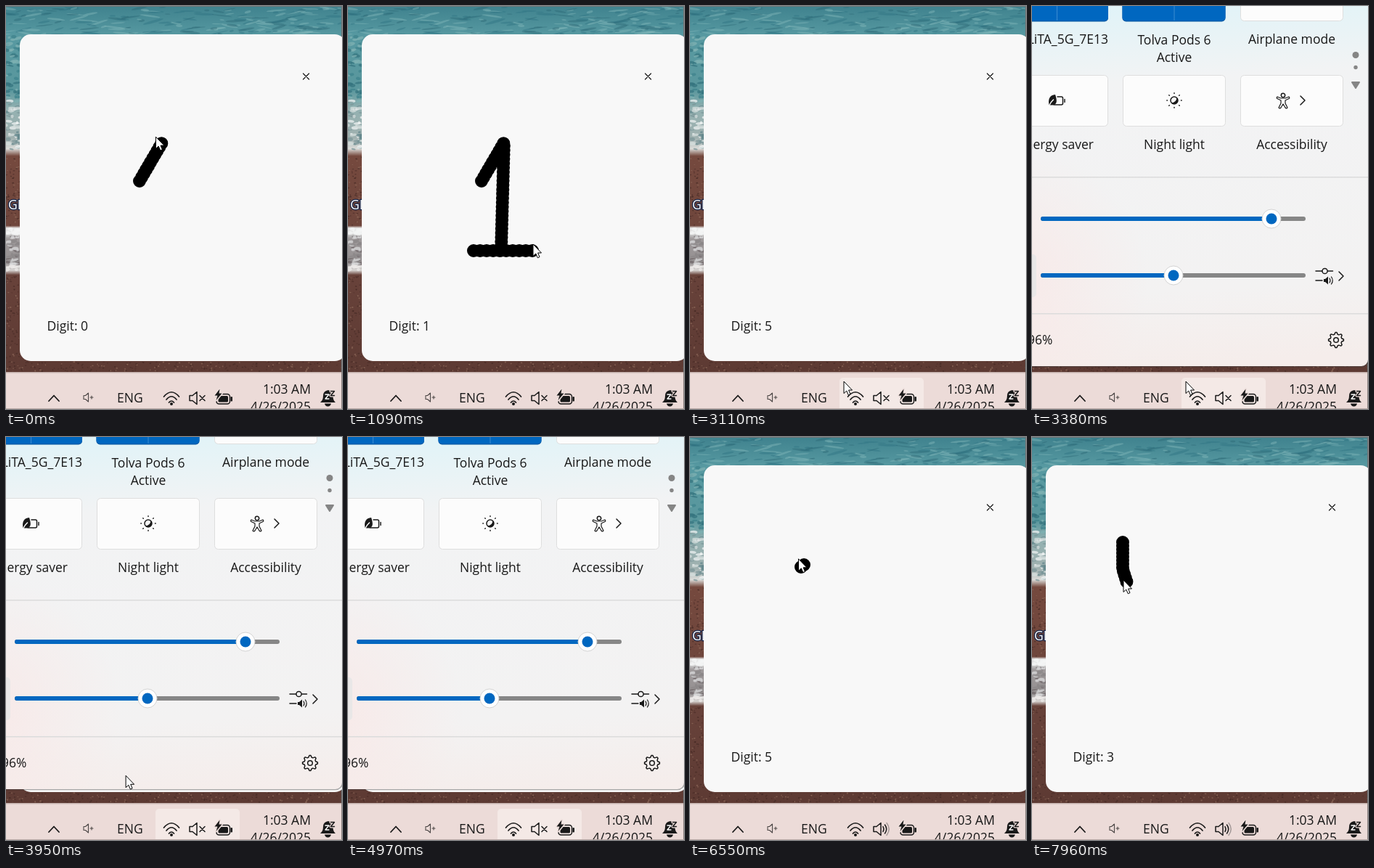
These frames come from a looping animation (463x555 px, 8 s). An HTML page:

```html
<!DOCTYPE html>
<html lang="en">
<head>
<meta charset="utf-8">
<title>Digit pad</title>
<style>
html, body { margin: 0; width: 100%; height: 100%; overflow: hidden; }
svg { display: block; width: 100vw; height: 100vh; }
text { font: 17.5px "Open Sans", "Noto Sans", sans-serif; fill: #191919; }
.mid { text-anchor: middle; }
.end { text-anchor: end; }
.line { fill: none; stroke: #191919; stroke-width: 1.5; stroke-linecap: round; stroke-linejoin: round; }
.thin { stroke-width: 1.2; }
.pale { stroke: #fff; }
.ink { fill: none; stroke: #000; stroke-width: 18; stroke-linecap: round; }
</style>
</head>
<body>
<svg id="stage" viewBox="0 0 463 555" preserveAspectRatio="none"></svg>
<script>
const stage = document.getElementById("stage");
const LOOP = 8000;

// Runs of evenly spaced steps: first time, last time, count
const RUNS = [
  [150, 1090, 8], [1230, 2160, 8], [2290, 2830, 5], [3110, 4100, 8],
  [4230, 5240, 9], [5360, 6280, 8], [6430, 7390, 8], [7540, 7960, 4]
];

// Pen strokes: drawn from..to, wiped at clear; off is the pointer tip from the pen
const STROKES = [
  { d: "M184 241L215 188L211 337", from: -190, to: 440, clear: 1220, gap: 6, off: [-8.5, -10] },
  { d: "M173 337H262", from: 680, to: 960, clear: 1220, gap: 9, off: [-7, -9] },
  { d: "M174 197C184 188 198 186 212 192C228 198 242 206 249 217C247 240 249 262 245 280C240 305 225 328 208 337C198 342 190 344 182 344L286 340",
    from: 1360, to: 1900, clear: 2150, gap: 10, off: [-7, -9] },
  { d: "M153 179L157 176C178 168 226 165 228 200C230 230 200 245 185 250C215 245 240 265 237 295C232 335 190 344 160 332",
    from: 6558, to: 7120, clear: 7530, gap: 5, off: [-8, -8] },
  { d: "M125 145V182L131 201", from: 7680, to: 7960, clear: 8000, gap: 5, off: [-5, -4] }
];

const POINTER = [
  [440, 204, 328], [680, 166, 328], [960, 255, 328], [1090, 255, 328], [1360, 167, 188],
  [1900, 279, 331], [2028, 269, 335], [2160, 264, 339], [2830, 212, 517], [3520, 212, 517],
  [4100, 150, 450], [4735, -20, 354], [5360, -20, 380], [5886, 231, 528], [6020, 231, 500],
  [6430, 150, 168], [6558, 149, 168], [7120, 152, 324], [7400, 160, 322], [7680, 120, 141]
];
const SLIDE = [
  [3110, 1200], [3252, 200], [3393, 11], [3534, 0],
  [5623, 0], [5754, 60], [5886, 225], [6017, 1200]
];
const LABELS = [[0, 0], [1080, 1], [2150, 5], [7380, 3]];

let seed = 7;
const rnd = (a, b) => {
  seed = (seed * 16807) % 2147483647;
  return a + (b - a) * seed / 2147483647;
};
const pick = (...list) => list[Math.floor(rnd(0, list.length))];
const many = (n, make) => Array.from({ length: n }, make).join("");
const line = (d, extra = "", cls = "") => `<path class="line ${cls}" d="${d}" ${extra}/>`;
const box = (x, y, w, h, fill, extra = "") =>
  `<rect x="${x}" y="${y}" width="${w}" height="${h}" fill="${fill}" ${extra}/>`;
const dot = (x, y, r, fill, extra = "") => `<circle cx="${x}" cy="${y}" r="${r}" fill="${fill}" ${extra}/>`;
const ring = (x, y, r) => dot(x, y, r, "none", 'class="line"');
const solid = (d, extra = "") => `<path d="${d}" fill="#191919" ${extra}/>`;
const text = (x, y, s, cls = "", extra = "") => `<text x="${x}" y="${y}" class="${cls}" ${extra}>${s}</text>`;
const at = (x, y, body) => `<g transform="translate(${x} ${y})">${body}</g>`;
const blob = (x, y, rx, ry, fill, o) => {
  const [cx, cy, a, b] = [x, y, rx, ry].map(v => v.toFixed(1));
  return `<ellipse cx="${cx}" cy="${cy}" rx="${a}" ry="${b}" fill="${fill}" opacity="${o}" transform="rotate(${rnd(-18, 12).toFixed(0)} ${cx} ${cy})"/>`;
};

function beach() {
  const ripple = () => blob(rnd(0, 463), rnd(2, 42), rnd(3, 15), rnd(.6, 1.8), pick("#2c6975", "#2f7482", "#82b7bb"), .45);
  const grain = (x, y0, y1) => blob(rnd(0, x), rnd(y0, y1), rnd(.6, 1.5), rnd(.6, 1.1), pick("#94705f", "#3f2621", "#4a2c26"), .6);
  const froth = (y0, y1, ...fills) => blob(rnd(0, 19), rnd(y0, y1), rnd(1.5, 6), rnd(.8, 2.6), pick(...fills), .75);
  return box(0, 0, 463, 510, "url(#shore)") + many(190, ripple) +
    many(45, () => froth(42, 132, "#35747f", "#3f838c", "#7fb1b3")) +
    many(50, () => froth(130, 200, "#eef2f1", "#d5dfde", "#7b9698", "#5f8489")) +
    many(12, () => froth(306, 314, "#f4f5f5")) +
    many(36, () => froth(316, 358, "#d9dadb", "#8a8587", "#6f6668")) +
    many(10, () => froth(358, 366, "#eceae8")) +
    many(70, () => grain(20, 208, 302)) + many(80, () => grain(20, 372, 504)) +
    many(220, () => grain(463, 490, 503)) +
    text(3, 280, "GI", "", 'style="fill:#fff;stroke:#17264a;stroke-width:2.5;paint-order:stroke"') +
    box(0, 0, 463, 1, "#707678") + box(462, 0, 1, 504, "#707678");
}

const pad = () => box(19, 39, 449, 450, "#f8f8f8", 'rx="15"') +
  line("M409.500 93l8 8m0-8l-8 8", "", "thin") + text(56.5, 447, "Digit:") + text(103, 447, "0", "", 'id="digit"');

const chevron = (x, y, cls = "") => line(`M${x - 3} ${y - 6}l6 6l-6 6`, "", cls);
const blueTile = x => box(x, -61, 142, 71.5, "#00529b", 'rx="5"') + box(x, -61, 142, 70.5, "#0067c0", 'rx="5"') +
  box(x + 71, -60, 1, 69, "#3d8bd0");
const tile = (x, y) => box(x + .5, y + .5, 141, 70, "#fcfcfc", 'rx="5" stroke="#dedede"');
const slider = (y, x) => box(12, y - 3, 365, 6, "#868686", 'rx="3"') + box(12, y - 3, x - 12, 6, "#0067c0", 'rx="3"') +
  dot(x, y, 13, "#fff", 'stroke="#d3d3d3"') + dot(x, y, 7.5, "#0067c0");

function gear() {
  const rim = many(32, (_, i) => {
    const r = i % 4 < 2 ? 10.5 : 8, a = (i - .5) * Math.PI / 16;
    return `${i ? "L" : "M"}${(r * Math.cos(a)).toFixed(1)} ${(r * Math.sin(a)).toFixed(1)}`;
  });
  return line(rim + "Z") + ring(0, 0, 3.3);
}

function flyout() {
  const rays = many(8, (_, i) => line("M0-9.500V-10.200", `transform="rotate(${i * 45})"`));
  const skip = flip => `<path d="M-10-10V10M10-9L-6 0L10 9Z" transform="scale(${flip} 1)" fill="#9b9d9e" stroke="#9b9d9e" stroke-width="2.4" stroke-linejoin="round"/>`;
  const media = at(97, -177, skip(1)) + at(295, -177, skip(-1)) +
    solid("M188-187L206-177L188-167Z", 'stroke="#191919" stroke-width="2" stroke-linejoin="round"');
  const top = blueTile(-37) + blueTile(124.5) + tile(287, -61) +
    chevron(69, -25, "pale") + chevron(231, -25, "pale") +
    line("M-9-28q9-9 18 0M-5-24q5-5 10 0M-2-20q2-2 4 0", "", "pale") +
    line("M154.500-30L165-20.500L160-16V-35L165-30.500L154.500-21", "", "pale thin") +
    at(358, -25, line("M10 0q0-2.500-3-2.500H3L-2-10H-4.500L-2.500-2.500H-6.500L-8.500-5H-10.500L-9 0L-10.500 5H-8.500L-6.500 2.500H-2.500L-4.500 10H-2L3 2.500H7q3 0 3-2.500Z")) +
    text(105, 41, "LiTA_5G_7E13", "end") + text(196, 42, "Tolva Pods 6", "mid") +
    text(196, 65.5, "Active", "mid") + text(358, 41, "Airplane mode", "mid");
  const low = tile(-37, 84) + tile(125, 84) + tile(287, 84) +
    at(34, 119, line("M1-5H6.500q2 0 2 2V4q0 2-2 2H-4M11-1.500V2.500") +
      solid("M-10.500 6.500Q-13-7-2-8Q3 6-6 6.500Z") + line("M-11 8Q-8 2-4.500-1", 'style="stroke:#fff"')) +
    at(196, 119, ring(0, 0, 5) + solid("M3.500-4A5 5 0 1 1-4 3.500Q3 3 3.500-4Z") + rays) +
    at(346, 119, ring(0, -7, 2.7) +
      line("M-8-5q-2 2 1 3l4 2v4l-3 6q1 2 3 0l3-5l3 5q2 2 3 0l-3-6V0l4-2q3-1 1-3l-5 2h-6Z", "", "thin")) +
    chevron(373, 119) +
    text(85, 185.5, "Energy saver", "end") + text(196, 185.5, "Night light", "mid") + text(358, 185.5, "Accessibility", "mid");
  const foot = box(-40, 224, 503, 1.5, "#dcdcdc") + box(-40, 412, 503, 1.5, "#dcdcdc") +
    box(-30, 331, 36, 59, "#e9e7e7", 'rx="5"') + slider(282, 330) + slider(360, 195) +
    line("M391 354h9m7.500 0h7M391 367h9") + ring(403.5, 354, 3.6) +
    solid("M402 365h2l4-3.500v11l-4-3.500h-2z") + line("M410 364q2 3 0 6m2.500-8q3.500 5 0 10", "", "thin") +
    chevron(426, 361) + text(28.5, 455, "96%", "end") + at(419, 449, gear()) +
    dot(446, 56.5, 4.5, "#858585") + dot(446, 73.5, 2.7, "#858585") +
    `<path d="M441 94h10l-5 8z" fill="#858585" stroke="#858585" stroke-width="2" stroke-linejoin="round"/>`;
  return media + top + low + foot;
}

const CARD = 'x="-40" y="-330" width="503" height="214" rx="9"';
const PANEL = 'x="-40" y="-95" width="503" height="580" rx="9"';
const rim = (shape, width, opacity) =>
  `<rect ${shape} fill="none" stroke="#404040" stroke-width="${width}" opacity="${opacity}"/>`;
const shade = [6, 12, 20, 28].map(w => rim(CARD, w, .055)).join("") + rim(CARD, 2.5, .4) + rim(PANEL, 2.5, .45);

function taskbar() {
  return box(0, 504, 463, 51, "#ecdbd8") + box(0, 504, 463, 1.5, "#c6b3af") +
    box(206, 512, 116, 50, "#f4e9e6", 'rx="5" id="hover"') +
    line("M59 544l7-7.500l7 7.500", 'style="stroke-width:1.8"') +
    line("M107 536.500h2.500l4-3.500v12l-4-3.500h-2.500zM116 539h4m-2-2v4", 'style="stroke:#4c4746;stroke-width:1.1"') +
    text(153, 546, "ENG") +
    line("M217.500 538q10.500-12.500 21 0M221 542q7-8.500 14 0M224.500 546q3.500-4 7 0", 'style="stroke-width:1.7"') + dot(228, 548, 2, "#191919") +
    line("M253 536.500h4l6-5v17l-6-5h-4z") + `<g id="mute">${line("M267 536.500l7 7m0-7l-7 7")}</g>` +
    `<g id="waves">${line("M266 536.500q2 3.500 0 7M268.500 534q4.500 6 0 12") + line("M271 531.500q6.500 8.500 0 17", 'style="stroke:#a59b99"')}</g>` +
    box(290, 534.5, 18.5, 13.5, "none", 'rx="3.5" class="line"') + box(292.5, 537, 13.5, 8.5, "#191919", 'rx="1.5"') +
    box(309.5, 538, 2.5, 6.5, "#191919", 'rx="1"') +
    solid("M294.500 527.500L287.500 536.500H291.500L289.500 543L297.500 533.500H293.500Z", 'stroke="#efe0dd" stroke-width="3" stroke-linejoin="round" paint-order="stroke"') +
    text(420, 534, "1:03 AM", "end") + text(420, 558, "4/26/2025", "end") +
    solid("M433 546q4-3 4-9q0-7 7-8q6 1 6.500 8q0 6 3.500 9zM439 547.500h9q-1 4-4.500 4t-4.500-4z") +
    line("M440 535h5l-5 6h5", 'style="stroke:#fff;stroke-width:1.3"') +
    line("M447.500 530.500h5l-5 6h5", 'style="stroke:#ecdbd8;stroke-width:4"') +
    line("M447.500 530.500h5l-5 6h5") +
    box(462, 504, 1, 51, "#8f8583") + box(0, 554, 463, 1, "#b9aaa7");
}

const stop = (o, c, a = 1) => `<stop offset="${o}" stop-color="${c}" stop-opacity="${a}"/>`;
stage.innerHTML = `<defs>
  <linearGradient id="shore" gradientUnits="userSpaceOnUse" x1="0" y1="0" x2="0" y2="504">
    ${stop(0, "#3f828e")}${stop(.08, "#5799a1")}${stop(.23, "#5a979d")}${stop(.28, "#93b1b1")}${stop(.36, "#9fb0af")}${stop(.39, "#dcdcd9")}
    ${stop(.41, "#75493e")}${stop(.6, "#6f463c")}${stop(.607, "#eceded")}${stop(.622, "#d8d8d8")}${stop(.635, "#a19c9d")}
    ${stop(.7, "#938e8f")}${stop(.722, "#d9d6d4")}${stop(.735, "#68423a")}${stop(1, "#5d3a33")}
  </linearGradient>
  <linearGradient id="glass" gradientUnits="userSpaceOnUse" x1="0" y1="0" x2="30" y2="504">
    ${stop(0, "#dff3f8")}${stop(.22, "#f2f3f4")}${stop(.8, "#f3f2f2")}${stop(1, "#f5edeb")}
  </linearGradient>
  <radialGradient id="blush" gradientUnits="userSpaceOnUse" cx="-30" cy="380" r="190">${stop(0, "#fbe3e1", .6)}${stop(1, "#fbe3e1", 0)}</radialGradient>
  <clipPath id="shape"><rect ${CARD} class="slide"/><rect ${PANEL} class="slide"/></clipPath>
</defs>
${beach()}${pad()}
${STROKES.map(s => `<path class="ink" d="${s.d}"/>`).join("")}
<g id="flyout">
  <g class="slide">${shade}</g>
  <g clip-path="url(#shape)">${box(0, 0, 463, 510, "url(#glass)")}${box(0, 0, 463, 510, "url(#blush)")}</g>
  <g class="slide">${flyout()}</g>
</g>
${taskbar()}
<path id="pointer" d="M0 0V16.500L3.800 13L6.300 18.800L9 17.600L6.600 12H11.500Z" fill="#fff" stroke="#000" stroke-width="1"/>`;

const get = id => document.getElementById(id);
const [digit, hover, mute, waves, panel, pointer] = ["digit", "hover", "mute", "waves", "flyout", "pointer"].map(get);
const slides = stage.querySelectorAll(".slide");
stage.querySelectorAll(".ink").forEach((el, i) => {
  STROKES[i].el = el;
  STROKES[i].length = el.getTotalLength();
});
const show = (el, on) => { el.style.display = on ? "" : "none"; };

function snap(t) {
  const run = RUNS.filter(r => r[0] <= t).pop();
  if (!run) return 0;
  const [from, to, count] = run, gap = (to - from) / (count - 1);
  return from + gap * Math.min(count - 1, Math.floor((t - from + 20) / gap));
}

function track(keys, t) {
  const next = keys.findIndex(k => k[0] > t);
  if (next === 0) return keys[0].slice(1);
  if (next < 0) return keys[keys.length - 1].slice(1);
  const a = keys[next - 1], b = keys[next], p = (t - a[0]) / (b[0] - a[0]);
  return a.slice(1).map((v, i) => v + (b[i + 1] - v) * p);
}

function draw(now) {
  const t = snap(now);
  let tip = track(POINTER, t);
  for (const s of STROKES) {
    const on = t >= s.from && t < s.clear;
    show(s.el, on);
    if (!on) continue;
    const reach = s.length * Math.min(1, (t - s.from) / (s.to - s.from));
    s.el.setAttribute("stroke-dasharray", `0 ${s.gap} `.repeat(Math.floor(reach / s.gap)) + "0 9999");
    if (t <= s.to) {
      const p = s.el.getPointAtLength(reach);
      tip = [p.x + s.off[0], p.y + s.off[1]];
    }
  }
  pointer.setAttribute("transform", `translate(${tip[0].toFixed(1)} ${tip[1].toFixed(1)})`);
  digit.textContent = LABELS.filter(k => k[0] <= t).pop()[1];
  const y = Math.round(track(SLIDE, t)[0]);
  show(panel, y < 900);
  slides.forEach(el => el.setAttribute("transform", `translate(0 ${y})`));
  show(hover, t > 2690 && t < 6100);
  show(mute, t < 5230);
  show(waves, t >= 5230);
}

const start = performance.now();
function tick() {
  draw((performance.now() - start) % LOOP);
  requestAnimationFrame(tick);
}
tick();
</script>
</body>
</html>
```
